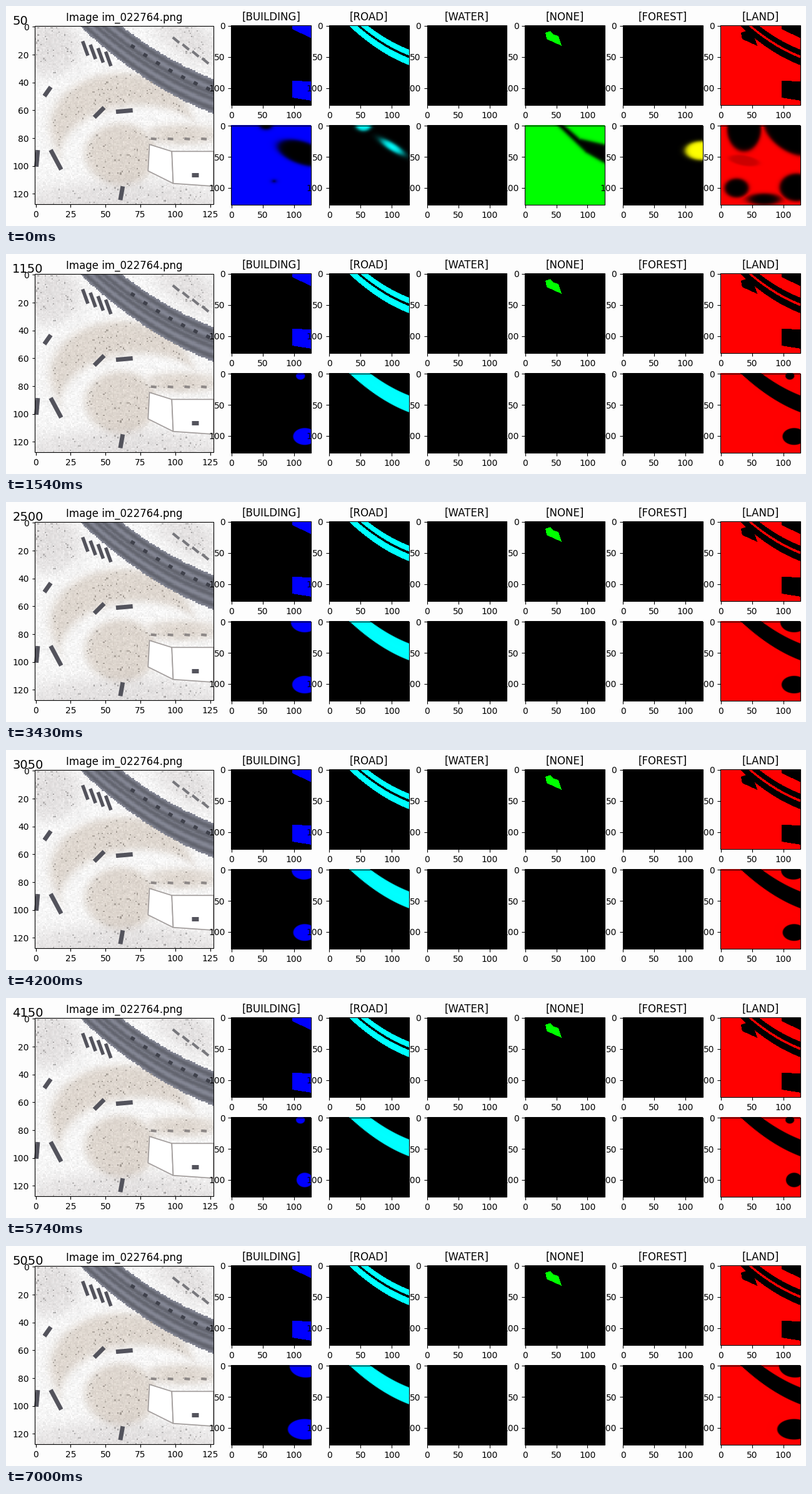
Recreate the animation shown at these times as a matplotlib script. Size 1280 by 353 pixels, loop 7070 ms.

```python
import numpy as np
import matplotlib.pyplot as plt
from matplotlib.animation import FuncAnimation
from matplotlib.path import Path

W, H, DPI, N = 1280, 353, 100, 128
FRAMES, STEP_MS = 101, 70
PT = DPI / 72
plt.rcParams["font.family"] = "DejaVu Sans"

X, Y = np.meshgrid(np.arange(N) + 0.5, np.arange(N) + 0.5)
NOTHING = np.full((N, N), -12.0)


# --- signed fields: positive inside, in cells ---
def poly(*pts):
    p = np.array(pts, float)
    grid = np.column_stack([X.ravel(), Y.ravel()])
    dist = np.full(N * N, 1e9)
    for a, b in zip(p, np.roll(p, -1, axis=0)):
        ab = b - a
        t = np.clip((grid - a) @ ab / (ab @ ab), 0, 1)
        dist = np.minimum(dist, np.hypot(*(grid - a - t[:, None] * ab).T))
    inside = Path(p).contains_points(grid)
    return np.where(inside, dist, -dist).reshape(N, N)


def ellipse(cx, cy, rx, ry, deg=0):
    c, s = np.cos(np.radians(deg)), np.sin(np.radians(deg))
    u, v = (X - cx) * c + (Y - cy) * s, (Y - cy) * c - (X - cx) * s
    return (1 - np.hypot(u / rx, v / ry)) * min(rx, ry)


def road_y(start, x):
    """Height of the road curve that leaves the top edge at start."""
    u = x - start
    return (0.94 - 0.0055 * (start - 31)) * u - 0.0029 * u * u


def band(left, right, block=1):
    x = X // block * block + block / 2
    return np.minimum(Y - road_y(right, x), road_y(left, x) - Y)


def union(*fields):
    return np.maximum.reduce(fields)


def soft(field, width):
    return 1 / (1 + np.exp(-np.clip(field / width, -40, 40)))


def paint(value, color):
    return value[..., None] * np.array(color, float)


CLASSES = {
    "BUILDING": (0, 0, 1), "ROAD": (0, 1, 1), "WATER": (0, 0, 1),
    "NONE": (0, 1, 0), "FOREST": (1, 1, 0), "LAND": (1, 0, 0),
}

# --- ground truth ---
true_building = union(poly((98, -1), (129, -1), (129, 21), (98, 6)),
                      poly((98.5, 89), (129, 90), (129, 121), (97.5, 116)))
true_road = union(band(31, 44), band(49, 61))
true_none = poly((33, 12), (41, 9), (47, 15), (54, 17), (59, 33), (35, 22))
TRUTH = [true_building, true_road, NOTHING, true_none, NOTHING,
         -union(true_building, true_road, true_none)]

# --- untrained guess ---
START = [
    -union(ellipse(115, 45, 42, 18, 18), ellipse(56, 0, 10, 7),
           ellipse(69, 90, 9, 6) - 5),
    union(ellipse(55, 0, 12, 9), ellipse(101, 35, 19, 5.5, 32)),
    NOTHING,
    -poly((46, -6), (58, -4), (88, 22), (140, 34), (140, 68), (98, 44)),
    ellipse(126, 41, 26, 15),
    -union(ellipse(38, 6, 27, 36), ellipse(112, 14, 48, 27, 35),
           ellipse(26, 101, 19, 15), ellipse(70, 119, 26, 9),
           ellipse(122, 100, 27, 22)),
]
STAIN = soft(ellipse(38, 57, 24, 8, 10), 0.8)

# --- training: both blobs swell and shrink between a few sizes ---
KEYS = [0, 11, 32, 49, 71, 82, 100]
SIZES = np.array([np.interp(range(FRAMES), KEYS, radii) for radii in
                  ([0, 0, 13, 22, 16, 7, 26], [12, 12, 21, 20, 17, 13, 27])])
jitter = np.random.default_rng(4).normal(0, 0.8, SIZES.shape)
jitter[:, KEYS] = 0
SIZES = np.maximum(SIZES + jitter, 0.1)


def predict(k):
    top, low = SIZES[:, k]
    building = union(
        ellipse(108 + 0.45 * top, 6 - 0.2 * top, top, 0.7 * top + 1),
        ellipse(118, 99 + 0.15 * low, low, 0.35 * low + 7))
    road = band(32, 65, 2)
    goal = [building, road, NOTHING, NOTHING, NOTHING,
            -union(building, road)]
    s = 1 - (1 - min(k / 11, 1)) ** 2
    out = []
    for a, b in zip(START, goal):
        f = np.clip(a, -12, 12) * (1 - s) + np.clip(b, -12, 12) * s
        out.append(soft(f, 1.5 - 1.2 * s))
    out[-1] = out[-1] * (1 - 0.2 * (1 - s) * STAIN)
    return out


# --- stage in pixel units ---
fig = plt.figure(figsize=(W / DPI, H / DPI), dpi=DPI, facecolor="#fdfdfd")
ax = fig.add_axes([0, 0, 1, 1])
ax.set(xlim=(0, W), ylim=(H, 0))
ax.autoscale(False)
ax.axis("off")


def panel(x, y, size, img, xticks, yticks, title, z):
    im = ax.imshow(img, extent=(x, x + size, y + size, y), aspect="auto",
                   interpolation="nearest", zorder=z)
    ax.add_patch(plt.Rectangle((x, y), size, size, fill=False, lw=0.8,
                               snap=True, zorder=z + 0.5))
    tx = [x + (t + 0.5) * size / N for t in xticks]
    ty = [y + (t + 0.5) * size / N for t in yticks]
    tick, gap = 3.5 * PT, 7 * PT
    style = dict(color="k", lw=0.8, snap=True, zorder=z + 0.5)
    ax.vlines(tx, y + size, y + size + tick, **style)
    ax.hlines(ty, x - tick, x, **style)
    for t, px in zip(xticks, tx):
        ax.text(px, y + size + gap, str(t), size=10, ha="center", va="top",
                zorder=z + 0.6)
    for t, py in zip(yticks, ty):
        ax.text(x - gap, py, str(t), size=10, ha="right",
                va="center_baseline", zorder=z + 0.6)
    ax.text(x + size / 2, y - 6 * PT, title, size=12, ha="center",
            va="baseline", zorder=z + 0.6)
    return im


# --- aerial view ---
PX, PY, SIDE = 46.4, 32.3, 285.9


def ground():
    rng = np.random.default_rng(11)
    sand = union(
        np.minimum(ellipse(62, 72, 51, 38), -ellipse(75, 97, 58, 40)),
        ellipse(62, 92, 26, 22), ellipse(105, 78, 26, 7))
    dust = union(ellipse(64, 130, 75, 18), ellipse(10, 16, 22, 20),
                 ellipse(110, 10, 24, 12, 30))
    img = np.full((N, N, 3), 0.97)
    img -= paint(soft(dust, 3), (0.08, 0.09, 0.09))
    img -= paint(soft(sand, 1.5), (0.10, 0.13, 0.16))
    img += rng.normal(0, 0.02, (N, N, 1))
    specks = (rng.random((N, N)) < 0.03) & (union(sand, dust) > 1)
    img[specks] -= 0.2

    road = band(32, 62)
    lanes = 0.47 + 0.07 * np.cos(road * 0.9)
    img[road > 0] = paint(lanes, (0.96, 0.98, 1.08))[road > 0]
    return np.clip(img, 0, 1)


def to_px(pts):
    return np.array(pts, float) * SIDE / N + (PX, PY)


def bar(x, y, length, deg, width=5, color="#53535c"):
    d = length / 2 * np.array([np.cos(np.radians(deg)),
                               np.sin(np.radians(deg))])
    ax.plot(*to_px([(x, y) - d, (x, y) + d]).T, color=color, lw=width,
            zorder=1.2, solid_capstyle="butt")


panel(PX, PY, SIDE, ground(), range(0, 126, 25), range(0, 121, 20),
      "Image im_022764.png", 1)

# walled yard
for pts in (((81, 104), (82, 85), (98, 90), (99, 113)),
            ((98, 90), (128, 90), (128, 115), (99, 113))):
    ax.add_patch(plt.Polygon(to_px(pts), fc="white", ec="#a09b9a", lw=1.2,
                             zorder=1.1))
bar(114.5, 107, 5, 0)

# parked vehicles, then cars on the road and marks beside it
for x, y, length, deg in ((9, 47, 8, -55), (46, 62, 10, -45),
                          (64, 61, 12, -5), (15, 96, 16, 62),
                          (1.5, 95, 12, 95), (62, 120, 10, 100)):
    bar(x, y, length, deg)
for i in range(4):
    bar(36 + 5.5 * i, 16 + 2.5 * i, 11, 70, 4)
for x in range(70, 128, 9):
    bar(x, 0.5 * (road_y(32, x) + road_y(62, x)) - 4, 3, 30, 4, "#3f414b")
for i in range(4):
    bar(101 + 7 * i, 10 + 5 * i, 6, 40, 3, "#77777c")
    bar(85 + 12 * i, 81, 4, 5, 3, "#8d8887")

# --- class panels ---
ims = []
first = predict(0)
for i, (name, color) in enumerate(CLASSES.items()):
    x, size, ticks = 360.3 + 156.6 * i, 127.8, (0, 50, 100)
    panel(x, 31.2, size, paint(TRUTH[i] > 0, color), ticks, ticks,
          f"[{name}]", 2 + i)
    ims.append(panel(x, 191.6, size, paint(first[i], color), ticks, ticks,
                     "", 10 + i))

counter = ax.text(10.2, 30, "50", size=14, va="baseline", zorder=20)


def update(k):
    for im, value, color in zip(ims, predict(k), CLASSES.values()):
        im.set_data(paint(value, color))
    counter.set_text(str(50 * (k + 1)))
    return [*ims, counter]


anim = FuncAnimation(fig, update, frames=FRAMES, interval=STEP_MS,
                     init_func=lambda: update(0), repeat=True, repeat_delay=0)
plt.show()
```
